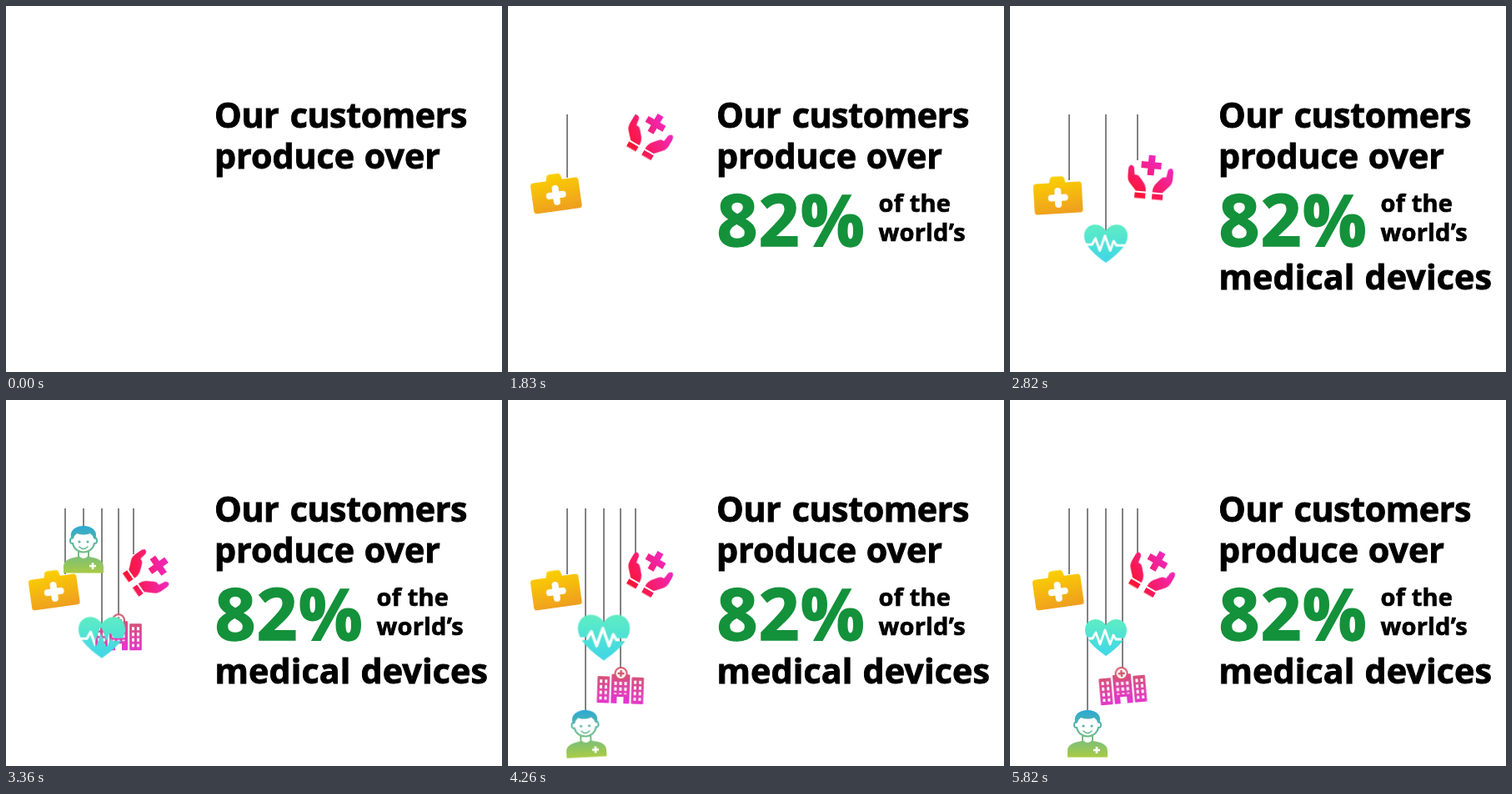
Recreate the animation shown at these times as an HTML page. Size 595 by 439 pixels, loop 9000 ms.

```html
<!DOCTYPE html>
<html lang="en">
<head>
<meta charset="utf-8">
<title>Medical devices</title>
<style>
html, body { margin: 0; width: 100%; height: 100%; overflow: hidden; background: #fff; }
svg { display: block; width: 595px; height: 439px; }
text { font: 700 41.2px "Noto Sans", "Open Sans", sans-serif; word-spacing: 1px; stroke: #000; stroke-width: .9px; }
.tight { letter-spacing: -.4px; word-spacing: 3px; }
.small { font-size: 29px; letter-spacing: .2px; word-spacing: 0; stroke-width: .7px; }
.big { font-size: 86px; letter-spacing: .8px; fill: #14913b; stroke: #14913b; stroke-width: 1.4px; }
.string { stroke: #4d4d4d; stroke-width: 1.4; }

.pct, .world, .devices, .bag, .hands, .heart, .clinic, .nurse,
.rock-bag, .rock-hands, .rock-clinic, .rock-nurse, .beat { animation: 9s linear infinite; }
.bag, .hands, .heart, .clinic, .nurse { animation-timing-function: cubic-bezier(.65, 0, .35, 1); }
.rock-bag, .rock-hands, .rock-clinic, .rock-nurse, .beat { animation-timing-function: ease-in-out; }

/* text cues */
.pct { animation-name: pct; }
.world { animation-name: world; }
.devices { animation-name: devices; }
@keyframes pct { 0%, 4.65% { opacity: 0 } 4.66%, 100% { opacity: 1 } }
@keyframes world { 0%, 9.98% { opacity: 0 } 9.99%, 100% { opacity: 1 } }
@keyframes devices { 0%, 29.98% { opacity: 0 } 29.99%, 100% { opacity: 1 } }

/* drops */
.bag { animation-name: bag; }
.hands { animation-name: hands; }
.heart { animation-name: heart; }
.clinic { animation-name: clinic; }
.nurse { animation-name: nurse; }
@keyframes bag {
  0%, 14.98% { opacity: 0; transform: translateY(-77px) }
  14.99%, 15% { opacity: 1; transform: translateY(-77px) }
  21.67%, 100% { opacity: 1; transform: none }
}
@keyframes hands {
  0%, 20.26% { opacity: 0; transform: translateY(-52px) }
  20.27%, 20.28% { opacity: 1; transform: translateY(-52px) }
  26.94%, 100% { opacity: 1; transform: none }
}
@keyframes heart {
  0%, 21.2% { opacity: 0; transform: translateY(-133px) }
  21.21%, 21.22% { opacity: 1; transform: translateY(-133px) }
  29.56%, 100% { opacity: 1; transform: none }
}
@keyframes clinic {
  0%, 32.65% { opacity: 0; transform: translateY(-190px) }
  32.66%, 32.67% { opacity: 1; transform: translateY(-190px) }
  41%, 100% { opacity: 1; transform: none }
}
@keyframes nurse {
  0%, 34.91% { opacity: 0; transform: translateY(-242px) }
  34.92%, 34.93% { opacity: 1; transform: translateY(-242px) }
  43.82%, 100% { opacity: 1; transform: none }
}

/* rocking and heartbeat */
.rock-bag { animation-name: rock-bag; }
.rock-hands { animation-name: rock-hands; }
.rock-clinic { animation-name: rock-clinic; }
.rock-nurse { animation-name: rock-nurse; }
.beat { animation-name: beat; }
@keyframes rock-bag {
  0%, 21% { transform: rotate(0deg) }
  25.33% { transform: rotate(-5deg) }
  32.2% { transform: rotate(5deg) }
  37.3%, 100% { transform: rotate(0deg) }
}
@keyframes rock-hands {
  0%, 26.9% { transform: rotate(0deg) }
  31.7% { transform: rotate(-25deg) }
  37.33% { transform: rotate(25deg) }
  43.3%, 100% { transform: rotate(0deg) }
}
@keyframes rock-clinic {
  0%, 40% { transform: rotate(5deg) }
  43.67% { transform: rotate(-7deg) }
  47.33% { transform: rotate(7deg) }
  52.7%, 100% { transform: rotate(0deg) }
}
@keyframes rock-nurse {
  0%, 44% { transform: rotate(0deg) }
  52.44% { transform: rotate(-9deg) }
  60% { transform: rotate(8deg) }
  64.67%, 100% { transform: rotate(0deg) }
}
@keyframes beat {
  0%, 29.33% { transform: scale(1) }
  35.2% { transform: scale(1.17) }
  41.1% { transform: scale(1) }
  47% { transform: scale(1.25) }
  52.9% { transform: scale(1) }
  58.8% { transform: scale(1.25) }
  64.67%, 100% { transform: scale(1) }
}
</style>
</head>
<body>
<svg viewBox="0 0 595 439">
  <defs>
    <linearGradient id="gold" gradientUnits="userSpaceOnUse" x1="0" y1="-26" x2="4" y2="18">
      <stop stop-color="#fbd000"/><stop offset="1" stop-color="#efa01f"/>
    </linearGradient>
    <linearGradient id="aqua" gradientUnits="userSpaceOnUse" x1="0" y1="-22" x2="0" y2="22">
      <stop stop-color="#5fedc4"/><stop offset="1" stop-color="#3fd6e8"/>
    </linearGradient>
    <linearGradient id="rose" gradientUnits="userSpaceOnUse" x1="-14" y1="18" x2="12" y2="-24">
      <stop stop-color="#fb1436"/><stop offset="1" stop-color="#f128bd"/>
    </linearGradient>
    <linearGradient id="plum" gradientUnits="userSpaceOnUse" x1="0" y1="-22" x2="3" y2="22">
      <stop stop-color="#d4566a"/><stop offset="1" stop-color="#e733da"/>
    </linearGradient>
    <linearGradient id="lime" gradientUnits="userSpaceOnUse" x1="0" y1="-28" x2="0" y2="28">
      <stop stop-color="#2ba9d6"/><stop offset="1" stop-color="#a8cb45"/>
    </linearGradient>
    <clipPath id="below"><rect y="130" width="595" height="309"/></clipPath>
    <mask id="pulse">
      <rect x="-30" y="-30" width="60" height="60" fill="#fff"/>
      <path d="M-28 1H-16L-12 -6L-7 8L-1 -9L5 8L9 -3L12 2H28" fill="none" stroke="#000" stroke-width="2.8" stroke-linejoin="round"/>
    </mask>
    <path id="plus" d="M0 -8V8M-8 0H8" stroke-width="8" stroke-linecap="round" stroke-linejoin="round"/>
    <g id="wing">
      <rect x="-7.3" y="-16" width="14.6" height="32" rx="1"/>
      <path d="M-3 -12V12M3 -12V12" stroke="#fff" stroke-width="3" stroke-dasharray="4 2.8"/>
    </g>
  </defs>

  <text class="tight" x="250" y="146">Our customers</text>
  <text x="250" y="195">produce over</text>
  <text class="big pct" x="250.5" y="288">82%</text>
  <g class="world">
    <text class="small" x="444.5" y="247">of the</text>
    <text class="small" x="444.5" y="282">world’s</text>
  </g>
  <text class="devices" x="250.5" y="340" letter-spacing=".15">medical devices</text>

  <g class="string" clip-path="url(#below)">
    <path class="bag" d="M71 -100V209"/>
    <path class="nurse" d="M93 -150V374"/>
    <path class="heart" d="M115 -100V271"/>
    <path class="clinic" d="M135 -100V321"/>
    <path class="hands" d="M153 -100V185"/>
  </g>

  <g transform="translate(93 400)"><g class="nurse"><g class="rock-nurse">
    <path d="M-24 28.5V21C-24 13 -17 11 -7 9Q0 15 7 9C17 11 24 13 24 21V28.5Z" fill="url(#lime)"/>
    <g fill="#fff" stroke="url(#lime)" stroke-width="2">
      <path d="M-6 2V9Q0 15 6 9V2"/>
      <path d="M-13 -20V-14C-17 -14 -17 -6 -13 -7C-10 7 10 7 13 -7C17 -6 17 -14 13 -14V-20Z"/>
    </g>
    <path d="M-14 -12C-18 -21 -11 -28 0 -28C11 -28 18 -21 14 -12L12 -13Q11 -17 8 -19Q0 -16 -8 -19Q-11 -17 -12 -13Z" fill="url(#lime)"/>
    <g fill="url(#lime)"><circle cx="-5" cy="-9" r="1.6"/><circle cx="5" cy="-9" r="1.6"/></g>
    <path d="M-5 -3Q0 2 5 -3" fill="none" stroke="url(#lime)" stroke-width="1.6" stroke-linecap="round"/>
    <path d="M11 16V24M7 20H15" stroke="#fff" stroke-width="2.6"/>
  </g></g></g>

  <g transform="translate(57.7 230)"><g class="bag"><g class="rock-bag"><g transform="rotate(-8)" fill="url(#gold)">
    <rect x="-29" y="-18" width="58" height="37" rx="3.5"/>
    <path d="M-10 -17L-8.5 -23Q-8 -25.5 -5 -25.5H5Q8 -25.5 8.5 -23L10 -17Z"/>
    <use href="#plus" stroke="#fff"/>
  </g></g></g></g>

  <g transform="translate(168 209)"><g class="hands"><g class="rock-hands"><g transform="rotate(30)" fill="url(#rose)">
    <path d="M-27 -12Q-26 -17 -23 -16Q-20 -15 -20 -11L-19 -5Q-15 -6 -12 -2L-7 4Q-4 8 -4 14H-16L-25 4Q-27 1 -27 -3ZM-17 16H-4V22.5H-17Z"/>
    <path d="M27 -12Q26 -17 23 -16Q20 -15 20 -11L19 -5Q15 -6 12 -2L7 4Q4 8 4 14H16L25 4Q27 1 27 -3ZM17 16H4V22.5H17Z"/>
    <path d="M-4 -30H4V-22H12V-14H4V-6H-4V-14H-12V-22H-4Z"/>
  </g></g></g></g>

  <g transform="translate(135 343)"><g class="clinic"><g class="rock-clinic"><g transform="rotate(-5)" fill="url(#plum)">
    <use href="#wing" x="-20.5" y="5"/>
    <use href="#wing" x="20.5" y="5"/>
    <rect x="-11" y="-14" width="22" height="35" rx="1"/>
    <path d="M-6 -5V10M0 -5V10M6 -5V10" stroke="#fff" stroke-width="3" stroke-dasharray="4 2.8"/>
    <path d="M-4 21V13H4V21Z" fill="#fff"/>
    <circle cy="-15" r="7" fill="#fff" stroke="#d4566a" stroke-width="2"/>
    <path d="M0 -19V-11M-4 -15H4" stroke="#d4566a" stroke-width="2.4"/>
  </g></g></g></g>

  <g transform="translate(115 285)"><g class="heart"><g class="beat">
    <path mask="url(#pulse)" fill="url(#aqua)" d="M0 22C-14 12 -25 2 -25 -9C-25 -17 -19 -22 -12.5 -22C-7 -22 -3 -19 0 -15C3 -19 7 -22 12.5 -22C19 -22 25 -17 25 -9C25 2 14 12 0 22Z"/>
  </g></g></g>
</svg>
</body>
</html>
```
